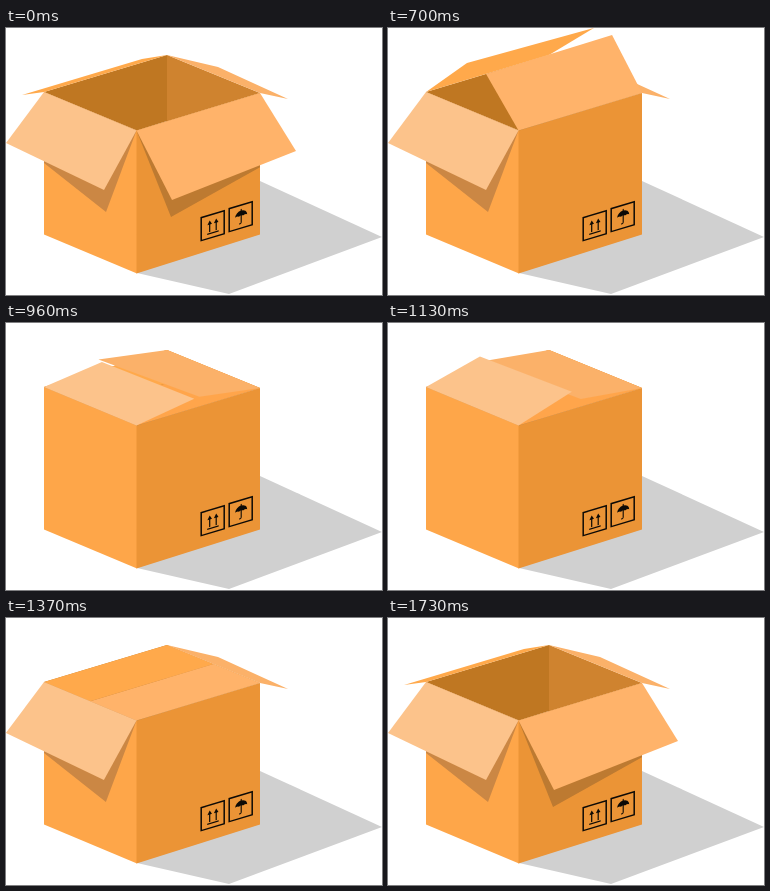
An HTML page that plays this animation: 376 by 267 pixels, repeating every 2.2 s.

```html
<!DOCTYPE html>
<html lang="en">
<head>
<meta charset="utf-8">
<title>Folding box</title>
<style>
  html, body { margin: 0; width: 100%; height: 100%; overflow: hidden; background: #fff; }
  svg { display: block; width: 100%; height: 100%; }
</style>
</head>
<body>
<svg viewBox="0 0 376 267">
  <clipPath id="leftClip"><path d="M38 64L131 102V246L38 206Z"/></clipPath>
  <clipPath id="rightClip"><path d="M131 102L254 65V206L131 246Z"/></clipPath>

  <path fill="#d0d0d0" d="M254 153L376 209L223 266L131 245Z"/>
  <path fill="#fea649" d="M38 64L131 102.6V245.6L38 206.4Z"/>
  <path fill="#eb9436" d="M130.5 102.6L254 65V206.4L130.5 245.6Z"/>
  <g clip-path="url(#leftClip)"><polygon id="leftShade" fill="#cb8744"/></g>
  <g clip-path="url(#rightClip)"><polygon id="rightShade" fill="#bd7a31"/></g>

  <g fill="none" stroke="#0d0a06" stroke-width="1.5">
    <g transform="matrix(1 -.3 0 1 195.2 189.6)">
      <path d="M0 0H23V23H0Z"/>
      <path stroke-width="1.2" d="M6 18.5H17.5M8.5 17V8M15 17V8"/>
      <path fill="#0d0a06" stroke="none" d="M6.2 9.5L8.5 5.5L10.8 9.5ZM12.7 9.5L15 5.5L17.3 9.5Z"/>
    </g>
    <g transform="matrix(1 -.3 0 1 223.2 180.6)">
      <path d="M0 0H23V23H0Z"/>
      <path stroke-width="1.1" d="M12 4V17Q12 19 10 18.2"/>
      <path fill="#0d0a06" stroke="none" d="M6 11A6 5.5 0 0 1 18 11Q16 9.8 14.3 11Q12 9.8 9.7 11Q8 9.8 6 11Z"/>
    </g>
  </g>

  <path fill="#cf832f" d="M161 27L254 65L131 102.6L161 93Z"/>
  <path fill="#bf7722" d="M38 64L161 27V93L131 102.6Z"/>
  <g id="flaps">
    <polygon id="backLeft" fill="#ffa94b"/>
    <polygon id="backRight" fill="#fbb169"/>
    <polygon id="frontRight"/>
    <polygon id="frontLeft" fill="#fcc38b"/>
  </g>
</svg>
<script>
const LOOP = 2200, FPS = 30;
const SWING = 220 * Math.PI / 180; // angle between shut and hanging open
const $ = id => document.getElementById(id);
const left = [38, 64], front = [130.5, 102.6], right = [254, 65], back = [161, 27];

// hinge: fixed edge; facing: opposite edge; raised, open: positions of the free edge;
// raisedAt: how far the flap has closed when it is in the raised position.
const flaps = {
  frontRight: { hinge: [front, right], facing: [left, back], raisedAt: .784,
    raised: [[98, 46], [224, 7]], open: [[166, 172], [290, 123]] },
  backLeft: { hinge: [left, back], facing: [front, right], raisedAt: .784,
    raised: [[79, 35], [206, 0]], open: [[16, 67], [136, 31]] },
  frontLeft: { hinge: [left, front], facing: [back, right], raisedAt: .583,
    raised: [[10, 15], [101, 42]], open: [[0, 115], [98, 162]] },
  backRight: { hinge: [back, right], facing: [left, front], raisedAt: .214,
    raised: [[200, 15], [290, 44]], open: [[212, 39], [282, 71]] }
};

const clamp = x => Math.min(1, Math.max(0, x));
const ramp = (t, from, to) => {
  const u = clamp((t - from) / (to - from));
  return u * u * (3 - 2 * u);
};

// Ellipse that starts at shut and passes raised and open at their angles.
function onArc(shut, raised, open, raisedAngle, angle) {
  const sr = Math.sin(raisedAngle), kr = 1 - Math.cos(raisedAngle);
  const so = Math.sin(SWING), ko = 1 - Math.cos(SWING);
  const det = sr * ko - kr * so, dr = raised - shut, d = open - shut;
  const p = (dr * so - d * sr) / det, q = (dr * ko - d * kr) / det;
  return shut - p * (1 - Math.cos(angle)) + q * Math.sin(angle);
}

const setPoints = (id, points) =>
  $(id).setAttribute('points', points.map(p => p.map(v => v.toFixed(2)).join()).join(' '));

// Draws a flap (0 open, 1 shut) and returns its free corners.
function drawFlap(id, closed) {
  const { hinge, facing, raised, open, raisedAt } = flaps[id];
  const tips = hinge.map((corner, i) => corner.map((v, axis) => onArc(
    (v + facing[i][axis]) / 2, raised[i][axis], open[i][axis],
    (1 - raisedAt) * SWING, (1 - closed) * SWING)));
  setPoints(id, [hinge[0], ...tips, hinge[1]]);
  return tips;
}

function draw(t) {
  const inner = ramp(t, 467, 800) - ramp(t, 1400, 1733);
  const reopen = ramp(t, 1090, 1370);
  const outer = ramp(t, 700, 1000) - reopen;

  drawFlap('backLeft', inner);
  drawFlap('backRight', ramp(t, 810, 1000) - reopen);
  const [[rx, ry], [sx, sy]] = drawFlap('frontRight', inner);
  const [[kx, ky], [lx, ly]] = drawFlap('frontLeft', outer);

  setPoints('rightShade', [front, [rx - 1, ry + 17], [sx, sy - 4], right]);
  setPoints('leftShade', [front, [lx + 2, ly + 22], [kx, ky - 10], left]);

  // The top panel darkens while the outer flaps stand over it.
  const shade = clamp(outer * 2);
  $('frontRight').setAttribute('fill',
    `rgb(255 ${Math.round(179 - 14 * shade)} ${Math.round(106 - 31 * shade)})`);

  // The rear flap moves in front once the inner pair is shut.
  $('flaps').insertBefore($('backRight'), $(inner > .99 ? 'frontLeft' : 'frontRight'));
}

const start = performance.now();
function tick() {
  const t = (performance.now() - start) % LOOP;
  draw(Math.floor((t + 8) * FPS / 1000) * 1000 / FPS);
  requestAnimationFrame(tick);
}
tick();
</script>
</body>
</html>
```
